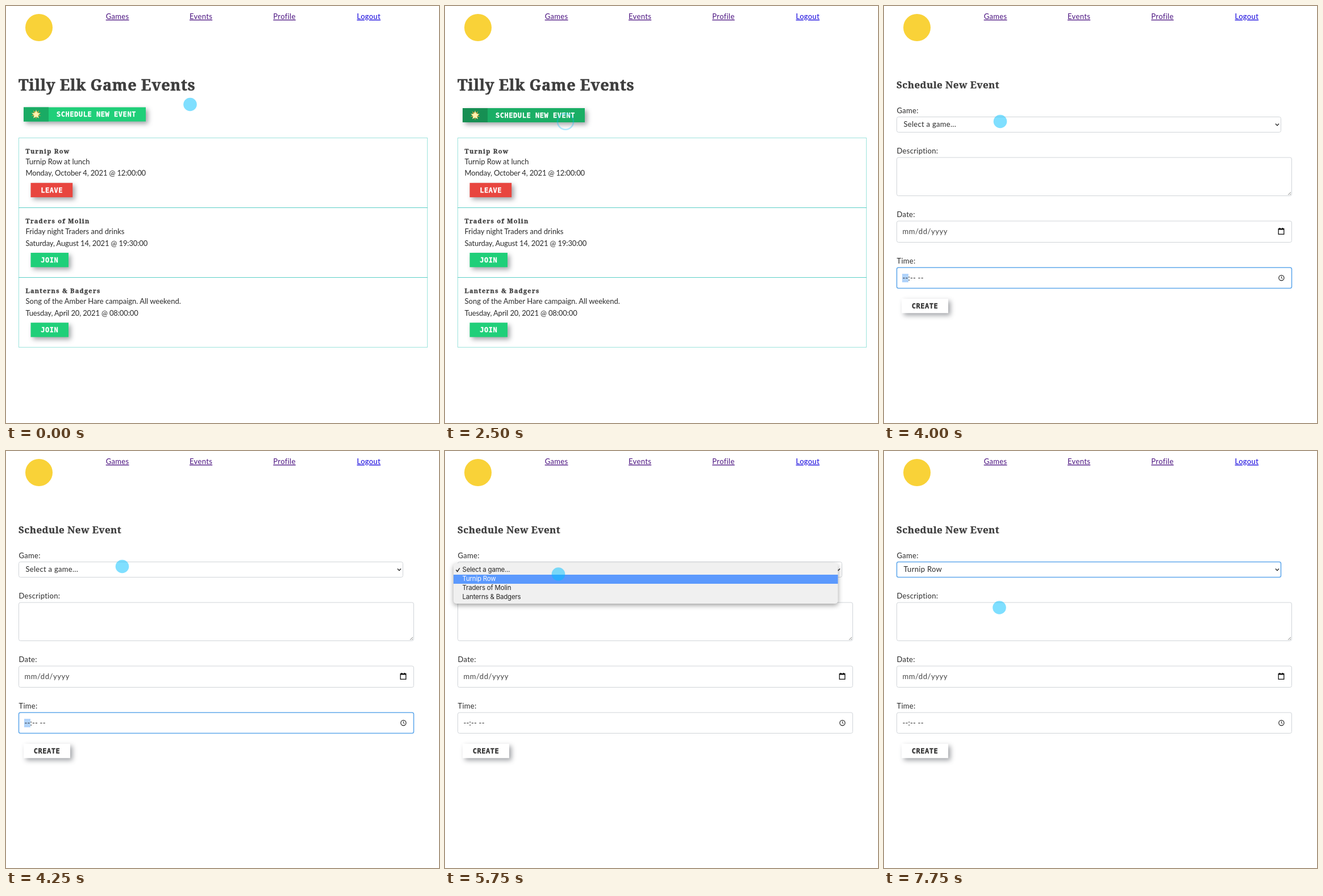
An HTML page for the animation above (8 s loop, 762 by 735 pixels).

```html
<!DOCTYPE html>
<html lang="en">
<head>
<meta charset="utf-8">
<title>Game events</title>
<style>
html, body { margin: 0; width: 100%; height: 100%; overflow: hidden; background: #fff; }
svg { display: block; width: 762px; height: 735px; }
text { white-space: pre; }
.body { font: 13px Lato, "Open Sans", sans-serif; fill: #2b2b2b; }
.date { letter-spacing: -.14px; }
.wide { letter-spacing: .3px; }
.wider { letter-spacing: .55px; }
.link { text-decoration: underline; letter-spacing: .35px; }
.h1, .h2, .h3 { font-family: "Noto Serif", serif; font-weight: 900; fill: #3e3e3e; stroke: #3e3e3e; stroke-width: .3px; }
.h1 { font-size: 27px; letter-spacing: .65px; stroke-width: .6px; }
.h2 { font-size: 17px; letter-spacing: .4px; }
.h3 { font-size: 11px; letter-spacing: 1.25px; }
.btn { font: 700 12px "DejaVu Sans Mono", monospace; letter-spacing: .55px; stroke-width: .3px; }
.item { font: 11.5px Inter, "Liberation Sans", sans-serif; letter-spacing: -.2px; fill: #262626; }
.raised { filter: drop-shadow(4px 4px 4px rgba(30, 35, 45, .42)); }
.menu-box { filter: drop-shadow(0 3px 4px rgba(0, 0, 0, .38)); }
</style>
</head>
<body>
<svg id="stage" viewBox="0 0 762 735"></svg>
<script>
const NS = "http://www.w3.org/2000/svg";
const LOOP = 8000, TICK = 250;
const stage = document.getElementById("stage");

function add(parent, tag, attrs = {}, label) {
  const node = document.createElementNS(NS, tag);
  set(node, attrs);
  if (label !== undefined) node.textContent = label;
  parent.appendChild(node);
  return node;
}
function set(node, attrs) {
  for (const key in attrs) node.setAttribute(key, attrs[key]);
}
const group = parent => add(parent, "g");
const show = (node, on) => set(node, { visibility: on ? "visible" : "hidden" });
const text = (parent, cls, x, y, label, more = {}) =>
  add(parent, "text", { class: cls, x, y, ...more }, label);
const rect = (parent, x, y, width, height, fill, more = {}) =>
  add(parent, "rect", { x, y, width, height, fill, ...more });
const path = (parent, d, stroke, width = 1) =>
  add(parent, "path", { d, stroke, "stroke-width": width, fill: "none" });

const caption = (parent, x, y, label, ink) =>
  text(parent, "btn", x, y, label, { fill: ink, stroke: ink });

function button(parent, x, y, w, fill, label, ink = "#fff") {
  rect(parent, x, y, w, 25.3, fill, { class: "raised" });
  caption(parent, x + 17.7, y + 16.7, label, ink);
}
function starPoints(cx, cy, outer, inner, n) {
  return Array.from({ length: 2 * n }, (_, i) => {
    const r = i % 2 ? inner : outer, a = i * Math.PI / n - Math.PI / 2;
    return `${(cx + r * Math.cos(a)).toFixed(2)},${(cy + r * Math.sin(a)).toFixed(2)}`;
  }).join(" ");
}
function field(parent, y, width, height) {
  return rect(parent, 22.5, y, width, height, "#fff", { rx: 3, stroke: "#d0d4d8" });
}

// Header
add(stage, "circle", { cx: 58, cy: 38, r: 24, fill: "#f9d238" });
["Games", "Events", "Profile", "Logout"].forEach((label, i) =>
  text(stage, "body link", 175.7 + 147.3 * i, 23, label,
    { style: `fill:${i < 3 ? "#4b1380" : "#1200dd"}` }));

// Event list
const list = group(stage);
text(list, "h1", 22, 149, "Tilly Elk Game Events");
const schedule = group(list);
const wideBar = rect(schedule, 31, 178.5, 215, 25, "#1fcf79", { class: "raised" });
const iconBar = rect(schedule, 31, 178.5, 44, 25, "#1aab64");
add(schedule, "polygon", { points: starPoints(53, 191, 9, 4, 10), fill: "#eda03c" });
add(schedule, "polygon", { points: starPoints(53, 191.3, 7.6, 3.6, 5), fill: "#fff3b0" });
caption(schedule, 89, 195.3, "SCHEDULE NEW EVENT", "#fff");

const events = [
  ["Turnip Row", "Turnip Row at lunch", "Monday, October 4, 2021 @ 12:00:00"],
  ["Traders of Molin", "Friday night Traders and drinks", "Saturday, August 14, 2021 @ 19:30:00"],
  ["Lanterns & Badgers", "Song of the Amber Hare campaign. All weekend.", "Tuesday, April 20, 2021 @ 08:00:00"]
];
events.forEach(([title, note, when], i) => {
  const y = 123.2 * i;
  text(list, "h3", 34.5, 259.5 + y, title);
  text(list, "body", 34.5, 279 + y, note);
  text(list, "body date", 34.5, 299.4 + y, when);
  if (i) button(list, 43.5, 311.8 + y, 66.5, "#1fcf79", "JOIN");
  else button(list, 43.5, 311.8, 73.7, "#e8463f", "LEAVE");
});
rect(list, 22.5, 232.5, 719, 369, "none", { stroke: "#9de3dc" });
path(list, "M22 355.5H742M22 478.5H742", "#5ccfc6");

// Event form
const form = group(stage);
text(form, "h2", 22, 145, "Schedule New Event");
[["Game:", 189], ["Description:", 260], ["Date:", 372], ["Time:", 454]].forEach(([label, y]) =>
  text(form, "body wide", 22.5, y, label));
const select = field(form, 195.5, 676, 27);
const choice = text(form, "body wide", 34.5, 213, "");
path(form, "M689 207.5L692 210.7L695 207.5", "#333", 1.5);
field(form, 267, 695, 67.5);
path(form, "M711 333L716 328M714 333L716 331", "#777", .9);
field(form, 379, 695, 37.5);
text(form, "body wider", 32.5, 402, "mm/dd/yyyy", { style: "fill:#444" });
rect(form, 694.2, 392.7, 9.6, 9.6, "none", { stroke: "#111", "stroke-width": 1.3 });
path(form, "M694 393.6H704M696.5 391V393M701.5 391V393", "#111", 2);
const timeBox = field(form, 461, 695, 36.5);
const timeMark = rect(form, 32, 472, 11, 15, "#b0d3fb");
text(form, "body", 32.5, 483.5, "--:-- --", { style: "letter-spacing:.2px" });
add(form, "circle", { cx: 699.4, cy: 479.3, r: 4.6, fill: "none", stroke: "#222", "stroke-width": 1.2 });
path(form, "M699.4 476.5V479.5L701.5 480.8", "#222", 1);
button(form, 31, 516, 82, "#fff", "CREATE", "#303030");

// Open dropdown
const menu = group(stage);
rect(menu, 15, 198, 676.5, 71, "#f0f0f0", { rx: 5, class: "menu-box" });
const highlight = rect(menu, 15, 202, 676.5, 16, "#5b99fd");
const tick = path(menu, "M19.5 209.5L21.8 212.5L25.8 206.3", "#222", 1.4);
const items = ["Select a game...", ...events.map(e => e[0])].map((label, i) =>
  text(menu, "item", 30.5, 213 + 16 * i, label));

// Pointer
const dot = add(stage, "circle", { r: 11.8, fill: "#00bfff", "fill-opacity": .5 });
const ring = add(stage, "circle", { fill: "none", stroke: "#00bfff", "stroke-width": 2.5 });

// Stops: tick, x, y
const stops = [
  [2, 324, 173.5], [7, 212, 191.5], [12, 212, 191.5], [15, 204.5, 203.5],
  [22, 204.5, 203.5], [23, 199.5, 217], [24, 198, 219.5], [28, 198, 219.5], [31, 203, 276]
];
const clicks = [10, 18, 26];
const ease = p => p * p * (3 - 2 * p);

function pointerAt(step) {
  if (step <= stops[0][0]) return stops[0].slice(1);
  const i = stops.findIndex(s => s[0] >= step);
  const [t0, x0, y0] = stops[i - 1], [t1, x1, y1] = stops[i];
  const p = ease((step - t0) / (t1 - t0));
  return [x0 + (x1 - x0) * p, y0 + (y1 - y0) * p];
}
function focus(box, on) {
  set(box, { stroke: on ? "#62a9ec" : "#d0d4d8", "stroke-width": on ? 1.6 : 1 });
}

function render(ms) {
  const step = Math.floor(ms % LOOP / TICK);
  const onForm = step >= 12, open = step >= 18 && step < 27;
  show(list, !onForm);
  show(form, onForm);
  show(menu, open);

  const hover = step >= 6;
  set(wideBar, { fill: hover ? "#1aae65" : "#1fcf79" });
  set(iconBar, { fill: hover ? "#168f53" : "#1aab64" });
  set(schedule, { transform: `translate(0 ${step >= 10 ? 1.5 : 0})` });

  const timeFocus = onForm && step < 18;
  focus(timeBox, timeFocus);
  show(timeMark, timeFocus);
  focus(select, step >= 28);
  choice.textContent = step >= 28 ? events[0][0] : "Select a game...";

  const row = step >= 23 ? 1 : 0;
  set(highlight, { y: 202 + 16 * row });
  items.forEach((item, i) => item.style.fill = i === row ? "#fff" : "");
  set(tick, { stroke: row ? "#222" : "#fff" });

  const [x, y] = pointerAt(step);
  const age = clicks.map(c => step - c).find(a => a === 0 || a === 1);
  const clicking = age !== undefined;
  show(dot, !clicking);
  show(ring, clicking);
  set(dot, { cx: x, cy: y });
  if (clicking) set(ring, { cx: x, cy: y + 12.3, r: 14 + age * .6, opacity: age ? .2 : .3 });
}

const start = performance.now();
function frame() {
  render(performance.now() - start);
  requestAnimationFrame(frame);
}
frame();
</script>
</body>
</html>
```
